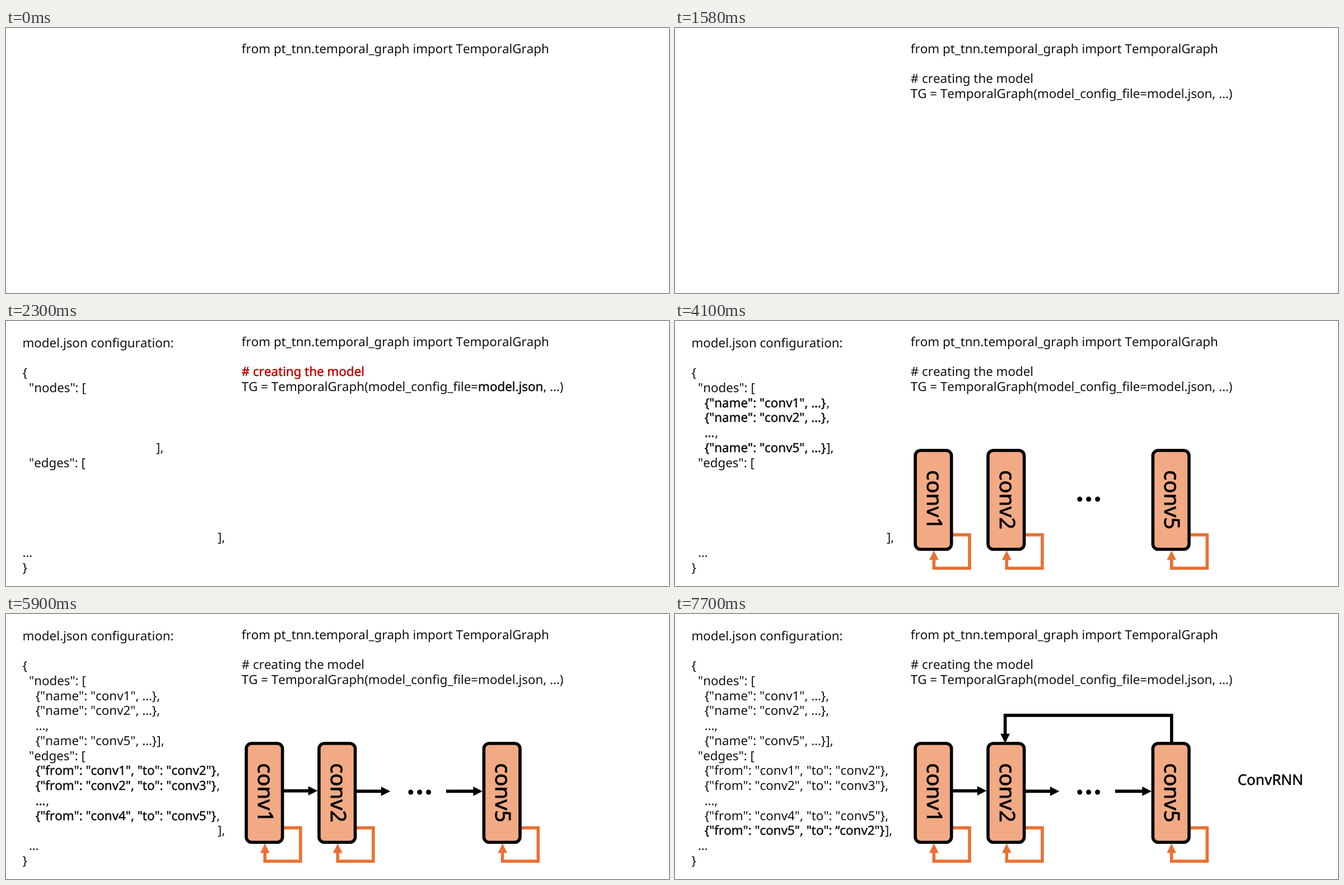
An HTML page that plays this animation: 1184 by 473 pixels, repeating every 8 s.

```html
<!DOCTYPE html>
<html lang="en">
<head>
<meta charset="utf-8">
<title>Building a temporal graph</title>
<style>
  html, body { margin: 0; height: 100%; overflow: hidden; background: #fff; }
  svg { display: block; width: 1184px; height: 473px; }
  text {
    font: 22.35px "Noto Sans", sans-serif; font-kerning: none; text-rendering: geometricPrecision;
    white-space: pre; fill: currentColor; color: #111;
  }
  .strong { stroke: currentColor; stroke-width: .5px; }
  .red { color: #c00000; }
  .label { font-size: 38px; text-anchor: middle; color: #000; stroke: #000; stroke-width: .8px; }
  .result { font-size: 26px; color: #000; }
  .line { fill: none; stroke: currentColor; stroke-width: 5.6; }
  .node { fill: #f2aa84; stroke: #000; stroke-width: 5.6; }
  .loop { color: #e97132; }
</style>
</head>
<body>
<svg id="stage" viewBox="0 0 1184 473"></svg>
<script>
const stage = document.getElementById("stage");
const LOOP = 8000;
const STARTS = [0, 500, 2300, 4100, 5900, 7700];
const PITCH = 26.75;

const text = (x, y, content, cls = "") => `<text x="${x}" y="${y}" class="${cls}">${content}</text>`;
const strong = s => `<tspan class="strong">${s}</tspan>`;
const left = (row, content, x = 29.4) => text(x, 46.7 + row * PITCH, content);
const right = (row, content, cls) => text(420.8, 44.9 + row * PITCH, content, cls);

// An entry is emphasised while it is new; its closing punctuation stays regular.
const entry = (row, body, end, isNew) =>
  left(row, "    " + (isNew ? strong(body) + `<tspan dx=".8">${end}</tspan>` : body + end));

const nodeEntry = name => `{"name": "${name}", …}`;
const edgeEntry = (from, to, quote = '"') => `{"from": "${from}", "to": ${quote}${to}"}`;

// Polyline whose last segment ends in an arrowhead at the tip.
function arrow(points, cls = "") {
  const [x, y] = points.at(-1), [px, py] = points.at(-2);
  const dx = Math.sign(x - px), dy = Math.sign(y - py);
  const bx = x - 16.6 * dx, by = y - 16.6 * dy;
  const shaft = [...points.slice(0, -1), [bx + dx, by + dy]];
  const head = [[x, y], [bx - 8.4 * dy, by + 8.4 * dx], [bx + 8.4 * dy, by - 8.4 * dx]];
  return `<g class="${cls}"><polyline class="line" points="${shaft.join(" ")}"/>` +
    `<polygon fill="currentColor" points="${head.join(" ")}"/></g>`;
}

function node(x, name) {
  return arrow([[x + 69, 381.6], [x + 99.7, 381.6], [x + 99.7, 441.2], [x + 36.1, 441.2], [x + 36.1, 409.8]], "loop") +
    `<rect class="node" x="${x + 2.8}" y="231" width="64.6" height="176.5" rx="9.5"/>` +
    `<text class="label" transform="translate(${x + 23.8} 319.2) rotate(90)">${name}</text>`;
}

function code(step) {
  const focus = step === 2;
  const file = focus ? strong("model.json") : "model.json";
  return right(0, "from pt_tnn.temporal_graph import TemporalGraph") +
    (step < 1 ? "" :
      right(2, "# creating the model", focus ? "red strong" : "") +
      right(3, `TG = TemporalGraph(model_config_file=${file}, …)`));
}

function config(step) {
  if (step < 2) return "";
  let out = left(0, "model.json configuration:") + left(2, "{") + left(3, '  "nodes": [') +
    left(8, '  "edges": [') + left(14, step > 2 ? "  …" : "…") + left(15, "}");
  if (step === 2) out += left(7, "],", 268.1);
  else out += entry(4, nodeEntry("conv1"), ",", step === 3) +
    entry(5, nodeEntry("conv2"), ",", step === 3) +
    entry(6, "…", ",", step === 3) +
    entry(7, nodeEntry("conv5"), "],", step === 3);
  if (step > 3) out += entry(9, edgeEntry("conv1", "conv2"), ",", step === 4) +
    entry(10, edgeEntry("conv2", "conv3"), ",", step === 4) +
    entry(11, "…", ",", step === 4) +
    entry(12, edgeEntry("conv4", "conv5"), ",", step === 4);
  return out + (step < 5 ? left(13, "],", 378) : entry(13, edgeEntry("conv5", "conv2", "“"), "],", true));
}

function diagram(step) {
  if (step < 3) return "";
  let out = node(426.3, "conv1") + node(556.2, "conv2") + node(850.6, "conv5");
  for (const x of [722.8, 738.7, 754.6]) out += `<circle cx="${x}" cy="318" r="4.5"/>`;
  if (step > 3) for (const [from, to, y] of [[495, 556.4, 315.6], [625, 686.4, 316.4], [786, 851, 316.4]])
    out += arrow([[from, y], [to, y]]);
  if (step > 4) out += arrow([[886.8, 230], [886.8, 180.9], [589.6, 180.9], [589.6, 230.4]]) +
    text(1004.7, 304.6, "ConvRNN", "result strong");
  return out;
}

let shown = -1;
function frame(now) {
  const step = STARTS.findLastIndex(start => start <= now % LOOP);
  if (step !== shown) {
    shown = step;
    stage.innerHTML = code(step) + config(step) + diagram(step);
  }
  requestAnimationFrame(frame);
}
frame(0);
</script>
</body>
</html>
```
